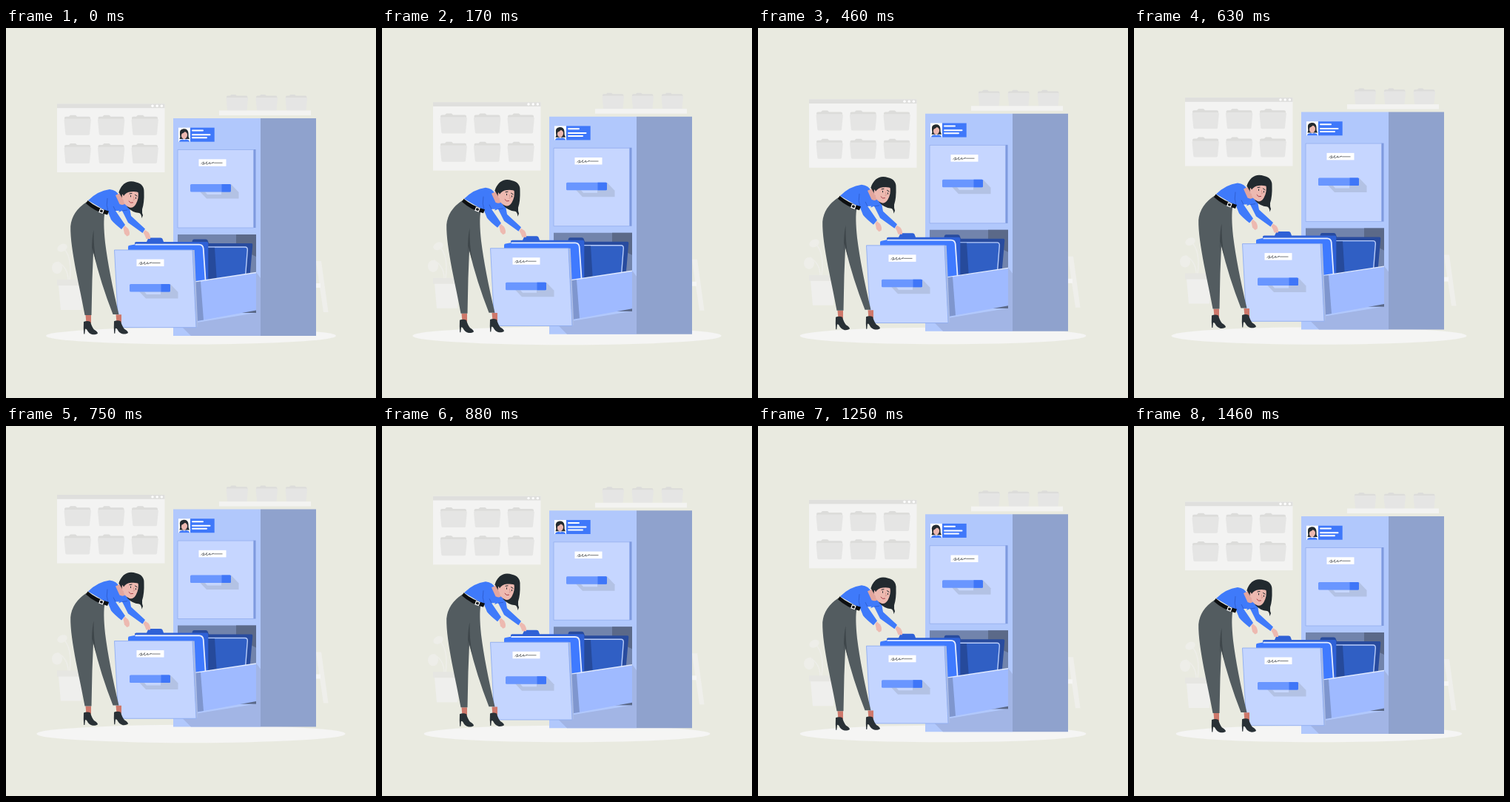
These frames come from a looping animation (500 by 500 pixels, 1500 ms). An HTML page:

```html
<!DOCTYPE html>
<html lang="en">
<head>
<meta charset="utf-8">
<title>Filing cabinet</title>
<style>
  html, body { margin: 0; height: 100%; overflow: hidden; background: #e9eae0; }
  svg { display: block; width: 100%; height: 100%; }
</style>
</head>
<body>
<svg viewBox="0 0 500 500">
  <defs>
    <g id="folder">
      <path fill="#dcdcda" d="M0 4Q0 2 2 2H6L8 0H15L17 2H33Q35 2 35 4V9H1Z"/>
      <path fill="#e5e5e4" d="M-.5 6.500Q-.5 5 1.500 5L4 4.800H33.500Q36 4.800 35.800 7L34 25.500Q33.800 27 32 27H3.500Q1.500 27 1.300 25.500Z"/>
    </g>
    <g id="handle">
      <path fill="#b3c2e4" d="M13 10L22 19.500H65.500V11L55 0Z"/>
      <path fill="#c6d6fc" d="M20 10.500H42V14H23Z"/>
      <rect width="55" height="10.500" rx="1.500" fill="#6996ff"/>
      <path fill="#3f76f8" d="M42.500 0H53.500Q55 0 55 1.500V9Q55 10.500 53.500 10.500H42.500Z"/>
    </g>
    <g id="label">
      <rect width="37" height="9.500" fill="#fff"/>
      <path fill="none" stroke="#3d4248" stroke-width=".7" d="M3 6.500Q6 3 7 4T5 7Q9 7 11 3.500Q9 8 12 6.500T15 4Q13 7.500 17 5.500T19 5Q20 4 21 5H32"/>
    </g>
    <g id="shoe">
      <path fill="#ce786b" d="M2.500-10H10V1H3.500Z"/>
      <path fill="#293136" d="M0-1Q5-3 9-1Q11 6 14 9.500Q18.500 12 19 14.500Q18 16.500 12 16.300Q7 15.500 4.500 10Q3 7.500 1.900 9L1.300 15.500H.2Q-.5 8 0-1Z"/>
    </g>
  </defs>

  <ellipse id="ground" cx="250" cy="416" rx="193.500" ry="11.300" fill="#f5f5f4"/>

  <g id="scene">
    <!-- wall window -->
    <rect x="69" y="102.500" width="145.500" height="92.500" fill="#f3f3f2"/>
    <rect x="69" y="102.500" width="145.500" height="5.700" fill="#dfdfdd"/>
    <g fill="#fff"><circle cx="198" cy="105.300" r="1.700"/><circle cx="204.200" cy="105.300" r="1.700"/><circle cx="210.400" cy="105.300" r="1.700"/></g>
    <g id="files"></g>
    <rect x="288" y="111.500" width="124" height="6.500" fill="#f3f3f1"/>

    <!-- plant and ladder -->
    <g fill="#eeeee9">
      <ellipse cx="69" cy="324" rx="7" ry="8"/>
      <ellipse cx="76" cy="297" rx="7" ry="5" transform="rotate(-25 76 297)"/>
      <path fill="none" stroke="#eeeee9" stroke-width="1.500" d="M86 341Q90 310 78 298M84 341Q84 324 70 316"/>
    </g>
    <path fill="#efefed" d="M71 347H104L102 381H74Z"/>
    <path fill="#e6e6e2" d="M69 340H105V348H69Z"/>
    <path fill="#efefeb" d="M419 315H426L435.500 384H429L419 316Z"/>
    <path fill="#f5f5f4" d="M419 345H425V351H419Z"/>

    <!-- cabinet -->
    <path fill="#b1c8fc" d="M226 122H344V416H226Z"/>
    <path fill="#8fa2cd" d="M344 122H419V416H344Z"/>
    <path fill="#a2b5e5" d="M238 404L250 416H344V338L338 330V385L258 398Z"/>
    <path fill="#7f9ade" d="M334 164H337.500V270H334Z"/>
    <path fill="#c6d6ff" stroke="#93aeee" stroke-width=".8" d="M232 164.500H334.500V270H232Z"/>
    <use href="#label" x="260.500" y="177.300"/>
    <use href="#handle" x="249" y="211"/>

    <!-- badge -->
    <rect x="249" y="134.700" width="32.700" height="19" fill="#3f78fa"/>
    <path stroke="#fff" stroke-width="2" stroke-linecap="round" d="M252 138.600H266M252 144.300H275.500M252 148.300H271"/>
    <rect x="233" y="134.700" width="16" height="19" fill="#fff"/>
    <path fill="#252c31" d="M234.500 150Q236 147 235 143Q234 137 240 136.300Q246 136 246.500 142Q246 147 248 150Z"/>
    <ellipse cx="241" cy="145" rx="4" ry="5" fill="#ecb8b0" transform="rotate(12 241 145)"/>
    <path fill="#252c31" d="M235.500 146Q235 138 241 138Q246 138 246 145Q245 141 242 140Q239 143 236.500 143Z"/>
    <path fill="#3f78fa" d="M234 153.700Q234 151 239 150.500Q241 152 243 150.500Q248 151 248 153.700Z"/>

    <!-- open drawer -->
    <path fill="#7284ac" d="M232 279H338V385H232Z"/>
    <path fill="#5b6988" d="M311 279H338V309L311 296Z"/>
    <path fill="#5b6988" d="M256 385H338V378Z"/>
    <path fill="#284b9e" d="M250 295L252 287Q252.500 285.500 254 285.500H270Q272 285.500 272.500 287L274 291H331.500Q333.500 291 333.300 293L329 342H252Z"/>
    <path fill="#305fc4" stroke="#b9cdfa" stroke-width="1.400" d="M270 296H323Q326.500 296 326.300 300L323 342H270Z"/>
    <path fill="#264a9b" d="M270 296.700H282L285 344H270Z"/>
    <path fill="#2f61d6" d="M174 293V290.500Q174 289 176 289H190L192 284.800Q192.500 283.500 194 283.500H209Q211 283.500 211.500 285L213 289H271Q273.300 289 273.300 291V345H174Z"/>
    <path fill="#3f7aff" d="M165 302V296Q165 293.800 167 293.800L174 292.500H262Q266 292.500 266.700 297L270 344H165Z"/>
    <path fill="none" stroke="#e6edff" stroke-width="1.800" d="M174.500 292.700H261Q266 292.700 266.700 298L269.800 344"/>
    <path fill="#9fbaff" d="M255 343.500L338 330.500V381.500L259 396Z"/>
    <path fill="none" stroke="#e0e9ff" stroke-width="1.400" d="M255 343L338 330.500"/>
    <path fill="#7f96ce" d="M255 343.500L263 342.500L267 394.500L258 396Z"/>
    <path fill="#a9bbe6" d="M252 300H254.700L259.300 403.500L257 405Z"/>
    <path fill="#c4d5ff" stroke="#8fadf0" stroke-width=".9" d="M146.500 300H252L257 404.700H152Z"/>
    <use href="#label" x="176.500" y="312.500"/>
    <use href="#handle" x="167" y="346"/>

    <!-- woman -->
    <use href="#shoe" x="105" y="398"/>
    <use href="#shoe" x="146" y="397.300"/>
    <path fill="#535c60" d="M109 235L133.500 249Q131 262 134 290Q139 330 152.500 387H144.500Q128 345 118 303L116.500 340L115.500 388H106.500C101 355 86.500 300 87.200 268Q89 248 109 235Z"/>
    <path fill="#3e464a" d="M118.500 273Q115.500 285 116 312L116.500 297L122 317Q118 295 118.500 273Z"/>
    <path fill="#3f7afa" d="M160 234L167 243L169 254L188 271.500L184.500 277L165 263L157 247L152 249Z"/>
    <path fill="#3f7afa" d="M111 233Q124 220 140 218Q150 219 153 227L158 238L163 239L165 247L148 247L161 266L156 272Q146 264 142 259L138 249Z"/>
    <path fill="none" stroke="#2b59c8" stroke-width=".8" d="M138 248Q135 240 137 230M148 247L145 241M157 247L164 246"/>
    <path fill="#0d0f11" d="M110.500 233Q122 243 139 247.500L137 252.500Q120 248 108 237Z"/>
    <rect x="126.500" y="245.200" width="4.800" height="4.400" fill="none" stroke="#fff" stroke-width="1.200" transform="rotate(20 129 247.500)"/>
    <g fill="#edb9b0">
      <path d="M160.500 267L165 271Q168 276 166.500 280L163.500 281.500L160 278L158.500 270.500Z"/>
      <path d="M188 273L192.500 276Q195.500 280 195 285H189.500L187.500 280L185.500 276.500Z"/>
      <path fill="#e3a69e" d="M148 226L157 222L163 236Q159 241 153.500 238Z"/>
    </g>
    <path fill="#222a2f" d="M152.500 222Q154 216 159 211Q166 205 176 208.500Q187 211 186.500 222Q187 236 184 245Q183.500 250 185 253L183.500 257Q183 251 180 250Q170 249 164 242Z"/>
    <path fill="#edb9b0" d="M158 221Q168 219 178.500 221Q180 230 175.500 238Q172 244 167 242.500Q160 240 158.500 233Q155 230 158 221Z"/>
    <path fill="#222a2f" d="M152.500 222.500Q156 213 167 211Q178 213 181 223Q176 220.500 169 221.300Q162 222 159 227Q157.500 223 152.500 222.500Z"/>
    <g fill="none" stroke="#222a2f" stroke-linecap="round">
      <path d="M168.500 226.500V228M175.500 229V230.500M167 224L170 223.500M174.500 225.500L177 227"/>
      <path stroke="#a33c46" d="M166 234Q168 237.500 171.500 236"/>
      <path stroke="#cf8b83" stroke-width=".8" d="M172.500 228L173.500 232L172 232.500"/>
    </g>
  </g>
</svg>
<script>
  const LOOP = 1500, LEAD = 20;
  const scene = document.getElementById('scene');
  const ground = document.getElementById('ground');

  const folder = (x, y, scale) =>
    `<use href="#folder" transform="translate(${x} ${y}) scale(${scale})"/>`;
  let files = '';
  for (let col = 0; col < 3; col++) {
    for (let row = 0; row < 2; row++) files += folder(79 + col * 45.5, 117.7 + row * 38.3, 1);
    files += folder(298 + col * 40, 90, 0.81);
  }
  document.getElementById('files').innerHTML = files;

  // Two beats per loop: [progress, scale]
  const beat = [[0, 1], [.1, 1.09], [.3, 1], [.4, 1], [.5, 1.09], [.6, 1], [1, 1]];
  function pulse(p) {
    const i = beat.findIndex(([at]) => at > p);
    const [p0, s0] = beat[i - 1], [p1, s1] = beat[i];
    return s0 + (s1 - s0) * (p - p0) / (p1 - p0);
  }

  function draw() {
    const p = ((performance.now() + LEAD) % LOOP) / LOOP;
    const lift = 10 * (1 - Math.abs(2 * p - 1));
    scene.setAttribute('transform', `translate(0 ${0.27 - lift})`);
    ground.setAttribute('transform', `translate(250 416) scale(${pulse(p)}) translate(-250 -416)`);
    requestAnimationFrame(draw);
  }
  draw();
</script>
</body>
</html>
```
